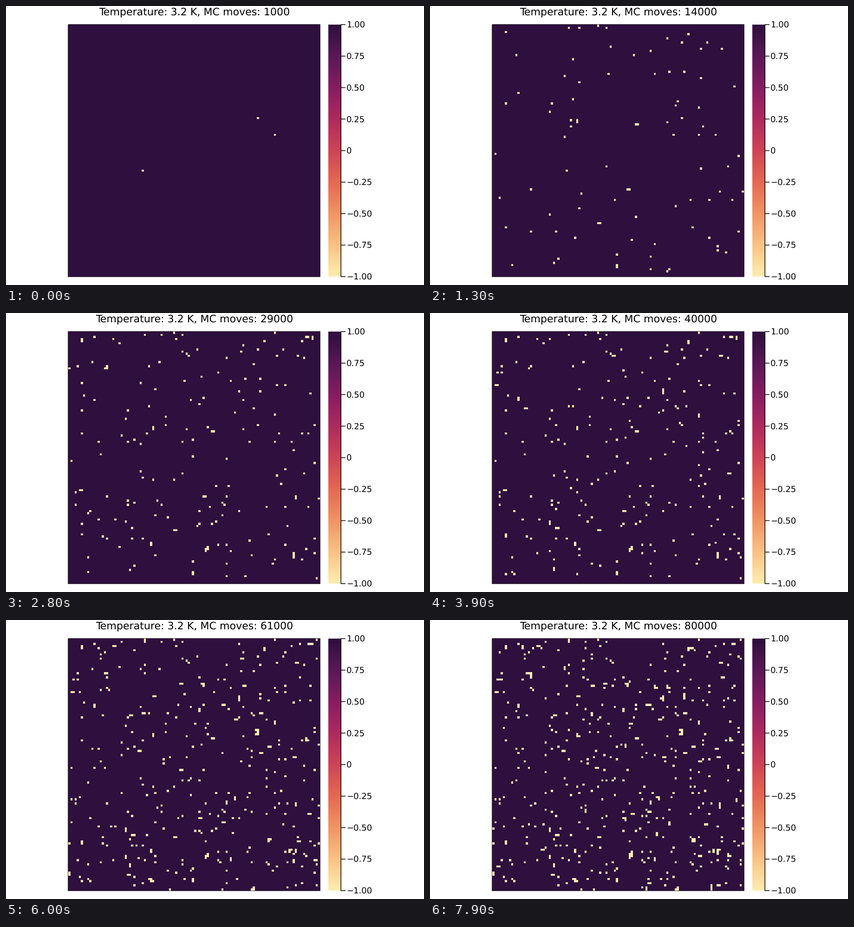
These frames come from a looping animation (900x600 px, 8 s). A matplotlib script:

```python
import math
import random

import matplotlib.pyplot as plt
import numpy as np
from matplotlib.animation import FuncAnimation
from matplotlib.colors import LinearSegmentedColormap

W, H, DPI = 900, 600, 100
FRAMES, INTERVAL = 80, 100
N = 120                      # lattice sites per side
MOVES = 1000                 # Monte Carlo moves per frame
TEMP = 3.2
LEFT, RIGHT, TOP, BOTTOM = 134, 676, 40, 582
BAR_LEFT, BAR_RIGHT = 694, 721
PX = 72 / DPI                # points per pixel

MATTER = LinearSegmentedColormap.from_list("matter", [
    "#feedb0", "#f9c284", "#f19463", "#e46853", "#cf4456",
    "#af2a5e", "#871c62", "#5a1857", "#2f0f3e"], N=256)


def simulate():
    """Spin lattice after each batch of moves, starting almost fully aligned."""
    rng = random.Random(7)
    spins = np.ones((N, N), dtype=np.int8)
    for row, col in ((44, 90), (52, 98), (69, 35)):
        spins[row, col] = -1
    states = [spins.copy()]
    base = 16 / TEMP
    back = math.exp(-8 / TEMP)
    for _ in range(FRAMES - 1):
        for _ in range(MOVES):
            r, c = rng.randrange(N), rng.randrange(N)
            if spins[r, c] < 0:
                accept = back
            else:
                around = (int(spins[r - 1, c]) + int(spins[(r + 1) % N, c])
                          + int(spins[r, c - 1]) + int(spins[r, (c + 1) % N]))
                accept = math.exp(2 * (4 - around) / TEMP - base)
            if rng.random() < accept:
                spins[r, c] *= -1
        states.append(spins.copy())
    return states


def line(xs, ys, zorder=3):
    ax.plot(xs, ys, color="black", lw=1.5 * PX, zorder=zorder, snap=False,
            solid_capstyle="butt", solid_joinstyle="round")


def picture(data, left, right):
    return ax.imshow(data, cmap=MATTER, vmin=-1, vmax=1, aspect="auto",
                     interpolation="nearest", zorder=2,
                     extent=(left, right, BOTTOM, TOP))


def title_text(i):
    return f"Temperature: {TEMP} K, MC moves: {(i + 1) * MOVES}"


plt.rcParams.update({"font.family": "DejaVu Sans", "text.hinting": "none"})
states = simulate()

fig = plt.figure(figsize=(W / DPI, H / DPI), dpi=DPI, facecolor="white")
ax = fig.add_axes([0, 0, 1, 1])

# The frame lies under the lattice, so only its outer half shows
line([LEFT, RIGHT, RIGHT, LEFT, LEFT], [TOP, TOP, BOTTOM, BOTTOM, TOP], 1)
grid = picture(states[0], LEFT, RIGHT)

# Colour bar
picture(np.linspace(1, -1, 256)[:, None], BAR_LEFT, BAR_RIGHT)
line([BAR_RIGHT + .25] * 2, [TOP - .5, BOTTOM + .5])
for k in range(9):
    value = 1 - k / 4
    y = TOP + (BOTTOM - TOP) * k / 8
    line([BAR_RIGHT, BAR_RIGHT + 10], [y, y])
    label = f"{value:.2f}".replace("-", "\u2212") if value else "0"
    ax.text(BAR_RIGHT + 11.7, y + 6, label, fontsize=18 * PX,
            ha="left", va="baseline")

title = ax.text((LEFT + RIGHT) / 2 + .5, 19.6, title_text(0),
                fontsize=22.2 * PX, ha="center", va="baseline")

ax.set_xlim(0, W)
ax.set_ylim(H, 0)
ax.axis("off")


def update(i):
    grid.set_data(states[i])
    title.set_text(title_text(i))
    return grid, title


anim = FuncAnimation(fig, update, frames=FRAMES, interval=INTERVAL,
                     repeat=True, repeat_delay=0, blit=False)
plt.show()
```
